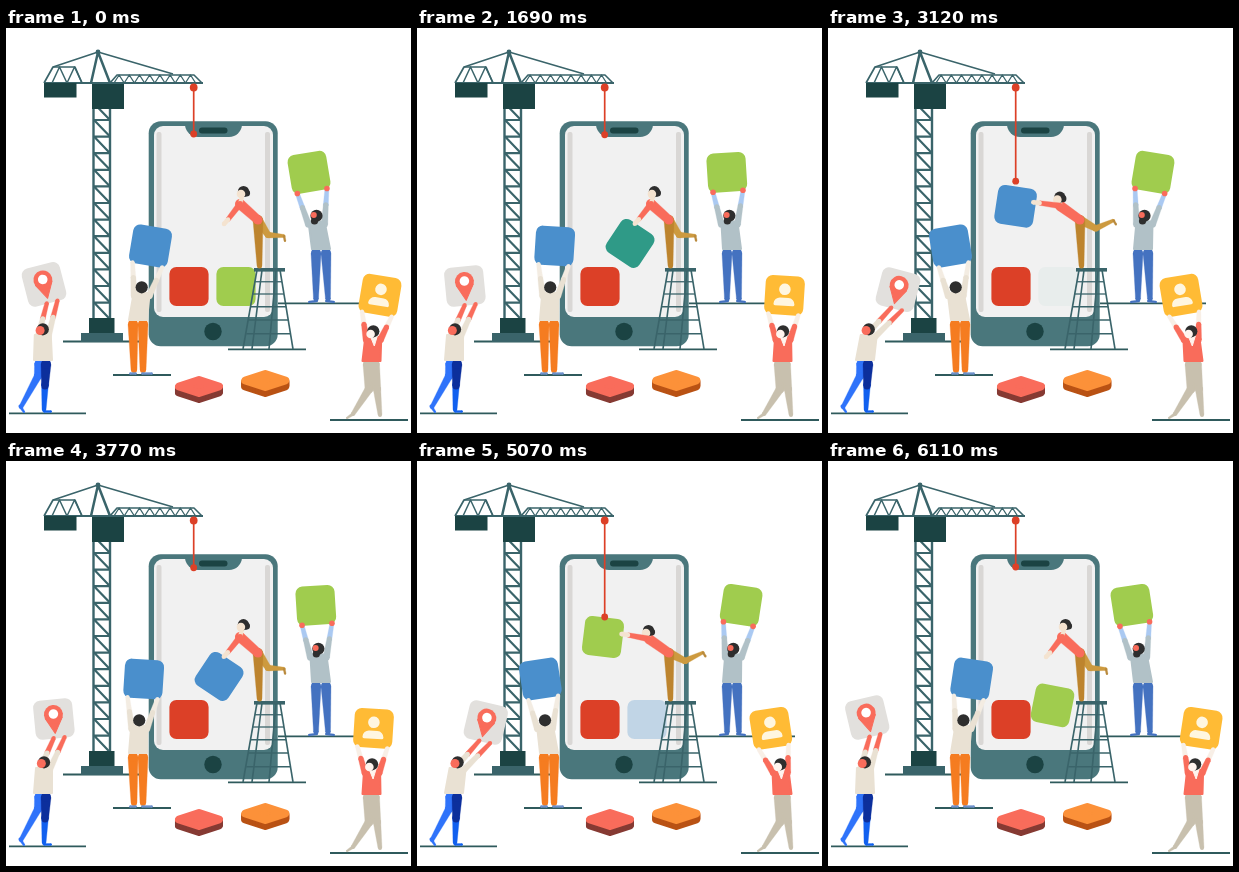
These frames come from a looping animation (405 px wide and 405 px high, 6.24 s). An HTML page with a canvas:

```html
<!DOCTYPE html>
<html>
<head>
<meta charset="utf-8">
<style>
html, body { margin: 0; width: 100%; height: 100%; overflow: hidden; background: #fff; }
canvas { display: block; width: 405px; height: 405px; }
</style>
</head>
<body>
<canvas id="stage"></canvas>
<script>
const STEP = 130, CYCLE = 16, ROUNDS = 3;
const INK = '#3a646a', DARK = '#1b4343', TEAL = '#4a777c', GROUND = '#2f5a5c', BLACK = '#2e2e2e';
const RED = '#dc4027', CORAL = '#f96c5b', CREAM = '#e9e1d3', SKIN = '#f4e3d0', PALE = '#f8efe6';
const BLUE = '#4a8fcc', GREEN = '#a0cc4e', TILES = [GREEN, '#2f9a87', BLUE];

const canvas = document.getElementById('stage');
const dpr = window.devicePixelRatio || 1;
canvas.width = canvas.height = 405 * dpr;
const c = canvas.getContext('2d');
c.scale(dpr, dpr);
c.lineJoin = 'round';

const clamp = v => Math.min(1, Math.max(0, v));
const mix = (a, b, k) => a + (b - a) * k;
const blend = (a, b, k) => a.map((v, i) => mix(v, b[i], k));

function trace(pts) {
  c.beginPath();
  for (const p of pts) c.lineTo(...p);
}
function line(pts, color, width = 1.5) {
  trace(pts);
  c.lineWidth = width;
  c.strokeStyle = color;
  c.stroke();
}
// Filled shape; soft adds a rounded rim
function poly(pts, color, soft = 1) {
  trace(pts);
  c.closePath();
  c.fillStyle = c.strokeStyle = color;
  c.lineWidth = soft;
  c.fill();
  c.stroke();
}
function rect(x, y, w, h, color, r = 0) {
  c.beginPath();
  c.roundRect(x, y, w, h, r);
  c.fillStyle = color;
  c.fill();
}
function dot([x, y], r, color) {
  c.beginPath();
  c.arc(x, y, r, 0, 2 * Math.PI);
  c.fillStyle = color;
  c.fill();
}
function zigzag(x, step, n, low, high, color, width) {
  line(Array.from({ length: n }, (_, i) => [x + i * step, i % 2 ? high : low]), color, width);
}
const ground = (x0, x1, y) => line([[x0, y], [x1, y]], GROUND, 1.8);

// Jointed limb narrowing from width w0 to w1
function limb(joints, w0, w1, color) {
  const last = joints.length - 1;
  for (let i = 0; i < last; i++) {
    const [a, b] = [joints[i], joints[i + 1]];
    const ra = mix(w0, w1, i / last) / 2, rb = mix(w0, w1, (i + 1) / last) / 2;
    const n = Math.atan2(b[1] - a[1], b[0] - a[0]) + Math.PI / 2;
    const off = (p, r) => [p[0] + r * Math.cos(n), p[1] + r * Math.sin(n)];
    poly([off(a, ra), off(b, rb), off(b, -rb), off(a, -ra)], color, .3);
    dot(a, ra, color);
    dot(b, rb, color);
  }
}

function tile(x, y, deg, color, icon) {
  c.save();
  c.translate(x, y);
  c.rotate(deg * Math.PI / 180);
  rect(-19.6, -19.6, 39.2, 39.2, color, 7);
  if (icon) icon();
  c.restore();
}
// Stage position of a point on a turned tile
function onTile(x, y, deg, dx, dy) {
  const a = deg * Math.PI / 180;
  return [x + dx * Math.cos(a) - dy * Math.sin(a), y + dx * Math.sin(a) + dy * Math.cos(a)];
}
function pinIcon() {
  poly([[-8.5, -1], [8.5, -1], [0, 14.5]], CORAL);
  dot([0, -4.5], 9.5, CORAL);
  dot([0, -5], 4.8, '#fff');
}
function userIcon() {
  dot([0, -6], 5.8, '#fff6e0');
  rect(-10.5, 2.5, 21, 8, '#fff6e0', [8, 8, 2, 2]);
}

function drawCrane() {
  line([[47, 39], [92, 24], [167, 46]], INK, 1.5);
  line([[38, 55], [47, 39], [69, 39], [76, 55]], INK, 1.7);
  zigzag(46, 7.5, 5, 55, 39, INK, 1.5);
  line([[104, 55], [111, 47], [188, 47], [196, 55]], INK, 1.6);
  zigzag(108, 5.1, 17, 55, 47, INK, 1.3);
  line([[85, 55], [92, 24], [104, 55]], INK, 2.5);
  dot([92, 24], 2.4, INK);
  line([[38, 55], [197, 55]], INK, 2.2);
  rect(38, 55, 32.5, 14.5, DARK);
  for (let y = 75.4; y < 290; y += 16.6) line([[104, y], [88, y], [104, y + 16.6]], INK, 2.2);
  for (const x of [87.5, 104]) line([[x, 80], [x, 291]], INK, 2.4);
  rect(86, 56, 32, 25, DARK);
  rect(83, 290, 25.5, 15, DARK);
  ground(57, 133, 313.5);
  rect(75, 305, 42, 9, INK);
}

function drawPhone() {
  rect(142.7, 93.3, 129, 225, TEAL, 12);
  rect(148, 98, 119, 191, '#f1f1f1', 9);
  for (const x of [150.5, 259]) rect(x, 104, 5, 180, '#d9d7d5', 2);
  rect(179, 95, 57, 14, TEAL, [0, 0, 13, 13]);
  rect(193, 99.5, 28.5, 6, DARK, 3);
  dot([207, 303.5], 8.7, DARK);
  tile(183, 258.5, 0, RED);
}

function drawLadder() {
  ground(222, 300, 321.3);
  for (const [a, b] of [[251, 237], [256, 246], [270, 263], [274, 287]]) line([[a, 242], [b, 321]], INK, 1.6);
  for (let i = 1; i < 6; i++) {
    const y = 242 + 11.5 * i + i * i / 4, spread = (y - 242) / 6;
    line([[251 - spread, y], [274 + spread, y]], INK, 1.3);
  }
  line([[248, 241.8], [279, 241.8]], INK, 3.6);
}

// k runs from leaning down (0) to stretched out (1)
function drawWorker(k) {
  const at = (x, y, dx, dy) => [x + dx * k, y + dy * k];
  const hip = at(252, 192, 0, 0), neck = at(234, 176, -2, 2), head = at(237.5, 163.5, -6, 6);
  const knee = at(262, 207, 6, -7), ankle = at(278, 208, 8, -16.5);
  const elbow = at(222, 191.5, -11, -17.5), hand = at(218, 196, -13.5, -23);
  limb([hip, knee, ankle], 9, 3, '#cd9a3f');
  limb([ankle, at(279, 213, 9.5, -17.5)], 2, 2, '#b98a3d');
  limb([hip, [253.5, 238]], 10, 5, '#bd842e');
  limb([neck, hip], 10, 9, CORAL);
  limb([neck, head], 4, 4, SKIN);
  dot(head, 5.6, BLACK);
  dot([head[0] + 3, head[1] + 1.5], 3.6, BLACK);
  dot([head[0] - 2.5, head[1] + 2.5], 4.3, SKIN);
  limb([neck, elbow], 6, 4.5, CORAL);
  limb([elbow, hand], 4.5, 4.5, SKIN);
}

// Someone swaying with a tile held overhead; s runs from -1 to 1
function drawCarrier(s, o) {
  const x = o.x + o.swing * s, y = o.y + (o.bob || 0) * s, deg = Math.sign(o.swing) * o.tilt * s;
  const [nx, ny] = [o.neck[0] + o.lean * s, o.neck[1]], [hx, hy] = o.hips;
  tile(x, y, deg, o.tile, o.icon);
  for (const [color, w0, w1, ...joints] of o.legs) limb(joints, w0, w1, color);
  o.grip.forEach((dx, i) => {
    const hand = onTile(x, y, deg, dx, 19);
    const shoulder = [nx + (i ? 1 : -1) * o.reach, ny + 3], elbow = blend(shoulder, hand, .55);
    limb([elbow, hand], 5, 4, o.arm);
    limb([shoulder, elbow], 6.5, 5, o.shirt);
    if (o.fist) dot(hand, 2.8, o.fist);
  });
  poly([[nx - 8, ny], [nx + 8, ny], [hx + 9, hy], [hx - 9, hy]], o.shirt, 2);
  if (o.collar) poly([[nx - 3, ny - 1], [nx + 4, ny - 1], [nx + 1, ny + 9]], o.collar);
  dot([nx, ny - 5.7], 6.1, BLACK);
  if (o.beard) dot([nx - 2, ny - .5], 3.6, BLACK);
  if (o.face) dot([nx - 2.7, ny - o.chin], o.faceSize, o.face);
}

const PALE_LEG = '#c8c0ae', JEANS = '#4472c0', ORANGE = '#f57c20', SHOE = '#6f92cc';
const carriers = [
  { x: 314, y: 144.3, swing: 11, tilt: 9.5, tile: GREEN, grip: [-15, 15], reach: 8,
    neck: [313.5, 193.5], lean: 3, hips: [315, 221], shirt: '#b1c1c7', arm: '#aac9f2', fist: CORAL,
    beard: true, face: CORAL, faceSize: 3, chin: 6.5,
    legs: [[JEANS, 10, 5, [310, 225], [310, 271]], [JEANS, 10, 5, [320, 225], [322, 271]],
      [JEANS, 2, 2, [303, 274], [311, 273]], [JEANS, 2, 2, [320, 273], [328, 274]]] },
  { x: 133.5, y: 218, swing: -11, tilt: 9.5, tile: BLUE, grip: [-15, 15], reach: 7.5,
    neck: [131.7, 265], lean: -4, hips: [132, 292], shirt: CREAM, arm: '#f3ece2',
    legs: [[ORANGE, 10, 6, [127, 296], [128, 342]], [ORANGE, 10, 6, [137, 296], [137, 342]],
      [SHOE, 2, 2, [124, 345.5], [130, 345.5]], [SHOE, 2, 2, [136, 345.5], [146, 345.5]]] },
  { x: 363.5, y: 267.3, swing: -10.5, tilt: 9.5, tile: '#ffbb35', icon: userIcon, grip: [-15, 15], reach: 7,
    neck: [365.3, 309], lean: -2, hips: [365.5, 333], shirt: CORAL, arm: PALE, collar: '#fff4ee',
    face: '#fff4ee', faceSize: 4.3, chin: 3,
    legs: [[PALE_LEG, 12, 4, [363, 336], [363, 361], [347, 386]], [PALE_LEG, 11, 4, [368, 336], [371, 361], [374, 387]],
      [PALE_LEG, 3, 2, [347, 386], [341, 390]]] },
  { x: 54, y: 259, swing: 16, tilt: 14.5, bob: 2.7, tile: '#e2e0dd', icon: pinIcon, grip: [-2, 9], reach: 5,
    neck: [38.8, 307], lean: 2, hips: [37, 332], shirt: CREAM, arm: CORAL,
    face: CORAL, faceSize: 4.5, chin: 4.5,
    legs: [['#2f73fa', 11, 4, [34, 336], [32, 348], [15, 379]], ['#1160ef', 7, 4, [39, 356], [38, 382]],
      ['#0c2f9c', 10, 7, [40, 336], [39, 358]], ['#2f73fa', 3, 2, [14, 378], [18, 384]],
      ['#1160ef', 2, 2, [38, 383.5], [45, 383.5]]] },
];

function drawBlock(x, y, color, side) {
  const face = [[x - 20, y], [x, y - 6.5], [x + 20, y], [x, y + 6.5]];
  for (let drop = 6; drop > 0; drop--) poly(face.map(([a, b]) => [a, b + drop]), side, 8);
  poly(face, color, 8);
}

function draw(time) {
  const step = Math.floor(time / STEP);
  const round = Math.floor(step / CYCLE) % ROUNDS, p = step % CYCLE;
  const sway = -Math.cos(2 * Math.PI * p / CYCLE);
  // Shared by the hook's drop and the worker's stretch
  const reach = p < 7 ? Math.sin(Math.PI / 2 * p / 7) : (1 + Math.cos(Math.PI * clamp((p - 7) / 6.5))) / 2;
  const hookY = 106 + 50 * reach;

  c.fillStyle = '#fff';
  c.fillRect(0, 0, 405, 405);
  drawCrane();
  drawPhone();

  c.globalAlpha = clamp((8.2 - p) / 4.2);
  tile(230, 258.5, 0, TILES[round]);

  // The next tile is lowered, pulled aside, then dropped into its slot
  const hung = [186, 176, 7], pulled = [213.5, 216, 34], slot = [230, 258.5, 0];
  let pose = blend(pulled, hung, reach);
  if (p < 7) pose = [186, hookY + 19.6, 7 * (p / 7) ** 4];
  if (p > 13) pose = blend(pulled, slot, (p - 13) / 3);
  c.globalAlpha = clamp(p / 3);
  tile(...pose, TILES[(round + 1) % ROUNDS]);
  c.globalAlpha = 1;

  line([[187.7, 59], [187.7, hookY]], RED, 1.7);
  dot([187.7, 59.5], 3.9, RED);
  dot([187.7, hookY], 3.4, RED);

  drawLadder();
  drawWorker(reach);
  ground(272, 378, 275.3);
  ground(107, 165, 347);
  ground(324, 402, 392);
  ground(3, 80, 385.3);
  for (const who of carriers) drawCarrier(sway, who);
  drawBlock(193, 358.5, CORAL, '#863a33');
  drawBlock(259.3, 352.5, '#fc9139', '#b95214');
}

const start = performance.now();
function frame() {
  draw(performance.now() - start);
  requestAnimationFrame(frame);
}
frame();
</script>
</body>
</html>
```
